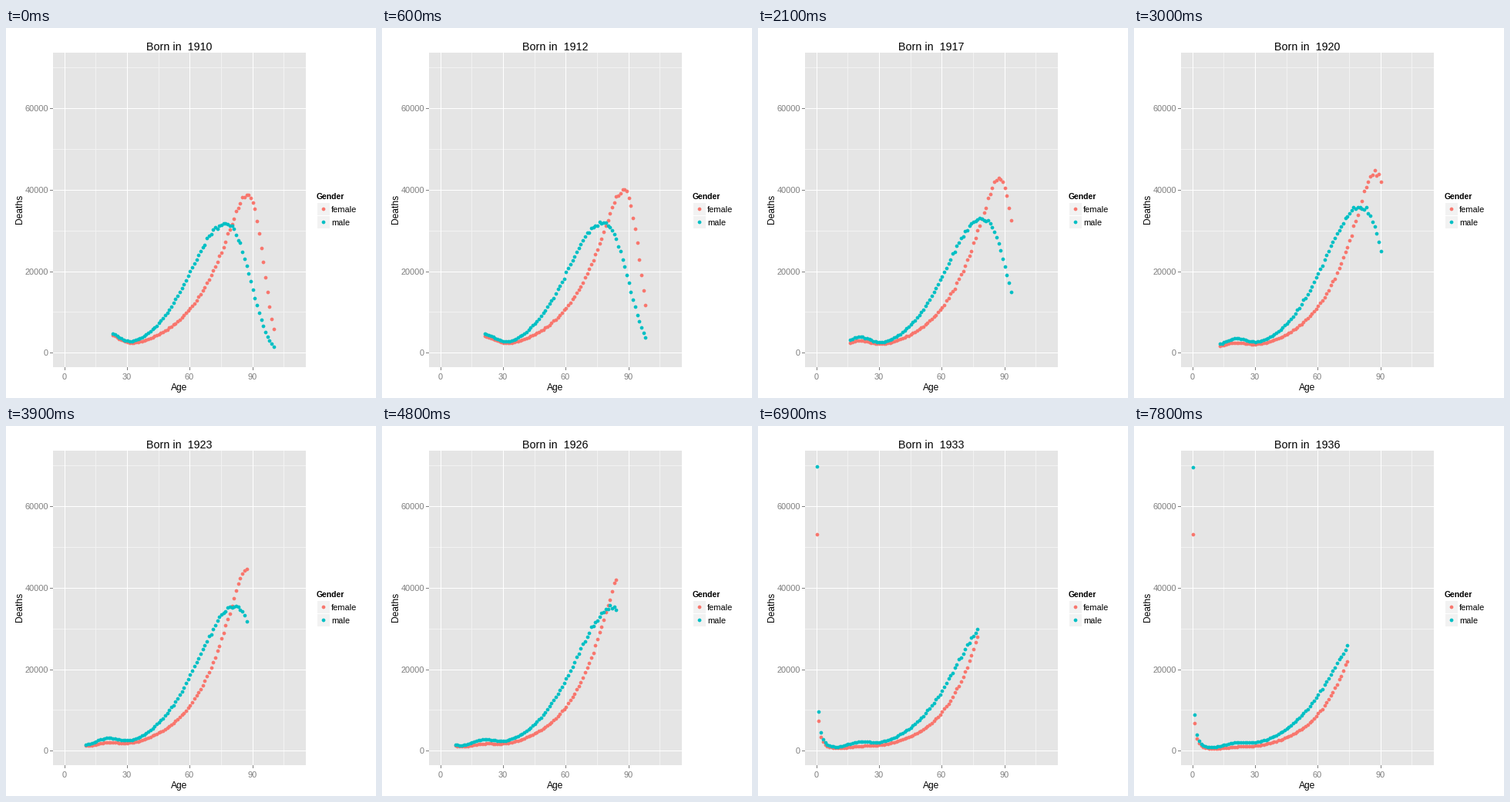
Recreate the animation shown at these times as a matplotlib script. Size 480 by 480 pixels, loop 8000 ms.

```python
import numpy as np
import matplotlib.pyplot as plt
from matplotlib.animation import FuncAnimation
from matplotlib.markers import MarkerStyle
from matplotlib.patches import Rectangle
from matplotlib.transforms import Affine2D

SIZE, DPI = 480, 72
FRAMES, INTERVAL, FRAMES_PER_YEAR = 80, 100, 3
FIRST_BORN, LAST_BORN = 1910, 1936
FIRST_RECORD, LAST_RECORD = 1933, 2010
LEFT, TOP, RIGHT, BOTTOM = 61, 32, 389, 440
FEMALE, MALE, GREY = "#F8766D", "#00BFC4", "#7F7F7F"
DOT_SIZE = 4.7

AGES = np.arange(101)
PEAK_YEARS = [1910, 1917, 1920, 1926, 1936]
wobble = np.random.default_rng(5).normal(
    0, 0.008, (LAST_BORN - FIRST_BORN + 1, 2, len(AGES)))


def old_age(peak, mode, rise, bend, fall):
    """Hyperbolic climb in log scale up to the mode, Gompertz decline after it."""
    before = np.maximum(mode - AGES, 0)
    z = fall * np.maximum(AGES - mode, 0)
    climb = rise * (np.hypot(before, bend) - bend)
    return peak * np.exp(-climb - (np.exp(z) - 1 - z))


def youth(amount):
    return amount * np.exp(-((AGES - 20) / 8) ** 2)


def infancy(amount, born):
    """Steep fall after birth, slower for the earlier cohorts."""
    earlier = LAST_BORN - born
    fall = (AGES + 0.293) ** (0.02 * earlier - 1.4)
    return amount * np.exp(0.025 * earlier) * fall * np.exp(-(AGES / 15) ** 2)


def deaths(born):
    """Female and male deaths by age."""
    t = born - FIRST_BORN
    female_peak = np.interp(born, PEAK_YEARS, [39000, 42700, 44600, 44600, 39800])
    male_peak = np.interp(born, PEAK_YEARS, [31800, 33200, 35800, 35200, 31000])
    female = (old_age(female_peak, 87.3, 0.058 + 0.00035 * t, 6, 0.116)
              + youth(3400 * np.exp(-0.085 * t)) + infancy(9500, born))
    male = (old_age(male_peak, 76.7 + 0.35 * t, 0.107 - 0.0009 * t, 30, 0.075)
            + youth(4200 * np.exp(-0.05 * t)) + infancy(12470, born))
    return np.array([female, male]) * (1 + wobble[t] * (AGES > 5))


def to_x(age):
    return np.round(75.75 + 2.711 * np.asarray(age))


def to_y(count):
    return np.round(421.25 - 0.005283 * np.asarray(count))


plt.rcParams["font.family"] = "Liberation Sans"
fig = plt.figure(figsize=(SIZE / DPI, SIZE / DPI), dpi=DPI, facecolor="white")
ax = fig.add_axes([0, 0, 1, 1])
ax.set(xlim=(0, SIZE), ylim=(SIZE, 0))
ax.axis("off")

# Centre each dot on the middle of its pixel.
half = 0.5 / DOT_SIZE
dot_marker = MarkerStyle("o").transformed(Affine2D().translate(half, -half))


def box(x, y, w, h, color):
    ax.add_patch(Rectangle((x, y), w, h, facecolor=color, linewidth=0, zorder=1))


def label(x, y, text, size, color="black", **style):
    return ax.text(x, y, text, size=size, color=color, va="baseline", **style)


def dots(x, y, color):
    return ax.plot(x, y, linestyle="none", marker=dot_marker, markersize=DOT_SIZE,
                   markeredgewidth=0, color=color, zorder=3)[0]


def grid(ages, counts, color):
    for age in ages:
        box(to_x(age), TOP, 1, BOTTOM - TOP, color)
    for count in counts:
        box(LEFT, to_y(count), RIGHT - LEFT, 1, color)


box(LEFT, TOP, RIGHT - LEFT, BOTTOM - TOP, "#E5E5E5")
grid(range(15, 106, 30), range(10000, 70001, 20000), "#F2F2F2")
grid(range(0, 91, 30), range(0, 60001, 20000), "white")

for age in range(0, 91, 30):
    box(to_x(age), BOTTOM, 1, 4, GREY)
    label(to_x(age), 456, str(age), 11, GREY, ha="center")
for count in range(0, 60001, 20000):
    box(LEFT - 4, to_y(count), 4, 1, GREY)
    label(55, to_y(count) + 4.4, str(count), 11, GREY, ha="right")

label(224.5, 470, "Age", 12, ha="center")
ax.text(24, 235, "Deaths", size=12, rotation=90, ha="right", va="center")

label(403, 222, "Gender", 10.4, weight="bold")
for row, (name, color) in enumerate([("female", FEMALE), ("male", MALE)]):
    y = 226 + 17 * row
    box(404, y + 1, 16, 16, "#F2F2F2")
    dots([411], [y + 8], color)
    label(422, y + 13, name, 11)

title = label(224.5, 29, "", 14.3, ha="center")
series = [dots([], [], color) for color in (FEMALE, MALE)]


def update(frame):
    born = FIRST_BORN + frame // FRAMES_PER_YEAR
    title.set_text(f"Born in  {born}")
    shown = slice(max(0, FIRST_RECORD - born), LAST_RECORD - born + 1)
    for line, counts in zip(series, deaths(born)):
        line.set_data(to_x(AGES[shown]), to_y(counts[shown]))
    return [title, *series]


anim = FuncAnimation(fig, update, frames=FRAMES, interval=INTERVAL,
                     repeat=True, repeat_delay=0, blit=False)
plt.show()
```
